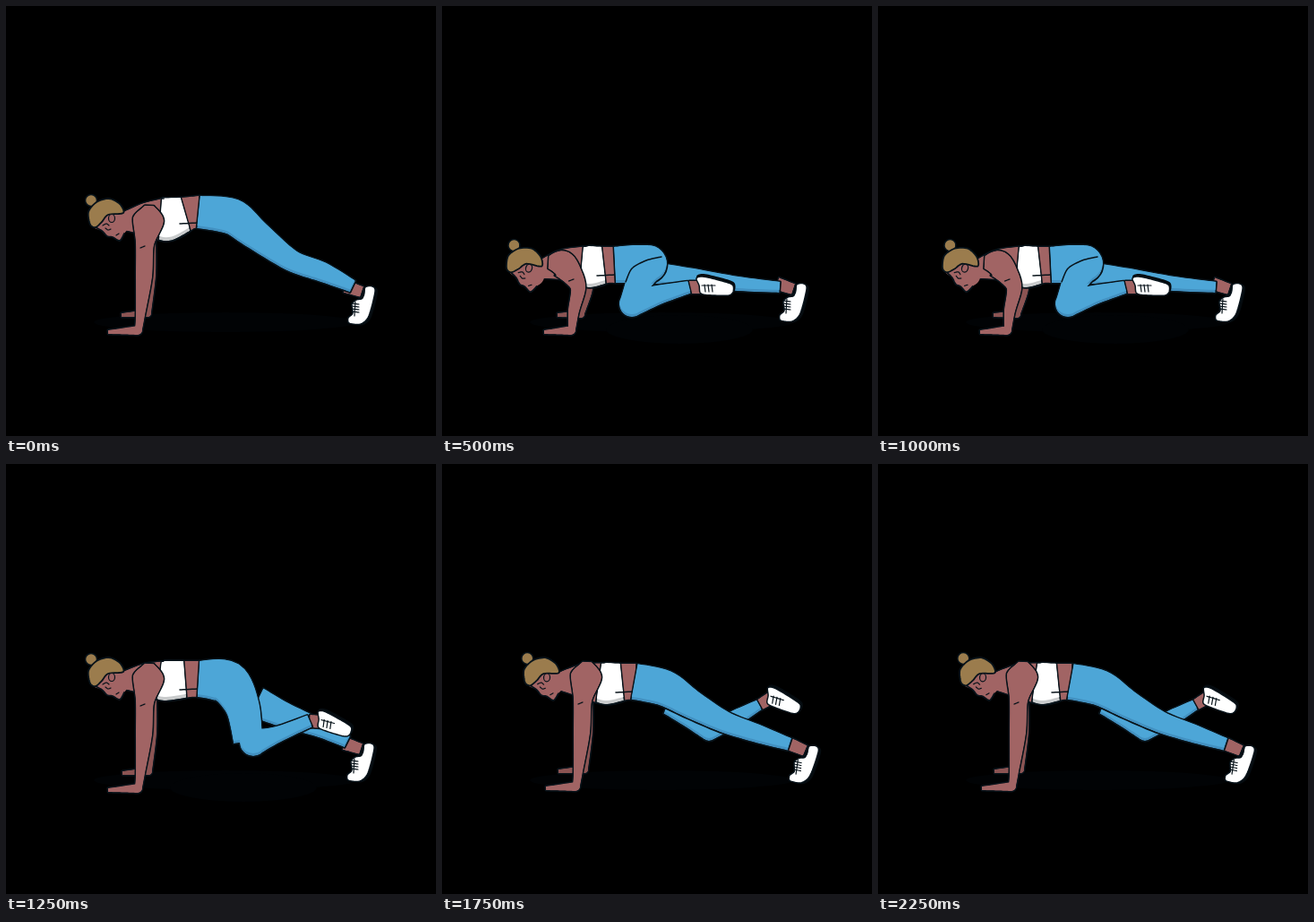
These frames come from a looping animation (480x480 px, 2500 ms). An HTML page with a canvas:

```html
<!DOCTYPE html>
<html lang="en">
<head>
<meta charset="utf-8">
<title>Push-up with knee tuck</title>
<style>
html, body { margin: 0; width: 100%; height: 100%; overflow: hidden; background: #000; }
canvas { display: block; width: 100vmin; height: 100vmin; }
</style>
</head>
<body>
<canvas id="stage" width="480" height="480"></canvas>
<script>
const ctx = document.getElementById('stage').getContext('2d');
const SKIN = ['#a16464', '#905655'], FAR_SKIN = ['#8b5453', '#8b5453'], HAIR = '#9b7c4d',
  BLUE = ['#4da6d7', '#4290c0'], WHITE = ['#fff', '#c9cbcc'],
  LINE = '#08131a', SOLE = '#050b0f', FLOOR = '#010305';
ctx.lineCap = ctx.lineJoin = 'round';

// Samples a smooth curve through points of any dimension
function spline(points, closed) {
  const n = points.length, out = [], steps = 8;
  const at = i => points[closed ? (i + n) % n : Math.max(0, Math.min(n - 1, i))];
  for (let i = 0; i < (closed ? n : n - 1); i++) {
    const [a, b, c, d] = [-1, 0, 1, 2].map(k => at(i + k));
    for (let s = 0; s < steps; s++) {
      const t = s / steps, h = t * t * (3 - 2 * t), u = t * (1 - t) * 0.42;
      out.push(b.map((v, k) => v + (c[k] - v) * h + u * ((1 - t) * (c[k] - a[k]) - t * (d[k] - v))));
    }
  }
  return closed ? out : [...out, points[n - 1]];
}
function trace(points, closed) {
  const path = new Path2D();
  points.forEach(([x, y]) => path.lineTo(x, y));
  if (closed) path.closePath();
  return path;
}
function ink(path, width = 1.5, color = LINE) {
  ctx.strokeStyle = color;
  ctx.lineWidth = width;
  ctx.stroke(path);
}
function fill(path, color) {
  ctx.fillStyle = color;
  ctx.fill(path);
}
const line = (points, width) => ink(trace(spline(points)), width);
function placed([x, y, angle = 0], draw) {
  ctx.save();
  ctx.translate(x, y);
  ctx.rotate(angle);
  draw();
  ctx.restore();
}
function oval(x, y, rx, ry, color) {
  const path = new Path2D();
  path.ellipse(x, y, rx, ry, 0, 0, 7);
  fill(path, color);
  return path;
}

// Outline of a limb whose joints are [x, y, radius]
function tube(joints) {
  const mid = spline(joints), top = [], bottom = [];
  mid.forEach(([x, y, r], i) => {
    const a = mid[Math.max(0, i - 1)], b = mid[Math.min(mid.length - 1, i + 1)];
    const dx = b[0] - a[0], dy = b[1] - a[1], k = r / Math.hypot(dx, dy);
    top.push([x + dy * k, y - dx * k]);
    bottom.unshift([x - dy * k, y + dx * k]);
  });
  return trace([...top, ...bottom], true);
}
// Joined tubes with one outline and a shaded lower edge
function limb([light, dark], chains, shade = 3) {
  const path = new Path2D();
  chains.forEach((joints, i) => {
    path.addPath(tube(joints));
    const [x, y, r] = joints[0], bend = new Path2D();
    bend.arc(x, y, r, 0, 7);
    if (i) path.addPath(bend);
  });
  ink(path, 3);
  ctx.save();
  ctx.clip(path);
  fill(path, dark);
  ctx.translate(0, -shade);
  fill(path, light);
  ctx.restore();
}

const shift = (x, y, chain) => chain.map(([a, b, r]) => [a + x, b + y, r]);
const mix = (a, b, t) => a.map((v, i) => v + (b[i] - v) * t);

function head(place) {
  placed(place, () => {
    const front = [[-14, 8], [-5, 13], [1, 19], [7, 20], [15, 24], [20, 16]];
    ink(oval(-17, -21, 6.5, 6.5, HAIR));
    fill(trace(spline([...front, [25, 8], [23, -6], [0, -8]], true)), SKIN[0]);
    line(front, 1.8);
    const hair = trace(spline([[-18, 6], [-20, -8], [-11, -19], [3, -23], [15, -17], [19, -7],
      [2, -5], [-5, 3], [-12, 9]], true), true);
    fill(hair, HAIR);
    ink(hair, 1.8);
    ink(oval(6, -1, 3.5, 4.5, SKIN[0]), 1.2);
    line([[-4, 7], [0, 5], [3, 7]], 1.2);
    line([[-1, 10], [2, 12], [5, 11]], 1.2);
    line([[11, 18], [14, 16]], 1.2);
  });
}

function plantedShoe(place) {
  placed(place, () => {
    limb(SKIN, [[[-20, -21, 7], [-2, -15, 6]]], 0);
    const shoe = trace(spline([[2, -20], [10, -21], [13, -15], [6, 12], [-3, 21], [-16, 20],
      [-17, 14], [-12, 9], [-13, -1], [-8, -6], [-1, -8]], true), true);
    placed([3, 1], () => fill(shoe, SOLE));
    fill(shoe, WHITE[0]);
    ink(shoe);
    line([[-5, -8], [0, -11], [1, -18]], 2);
    line([[-9, -4], [-10, 12]], 1.2);
    for (let y = -2; y < 9; y += 3) line([[-13, y], [-5, y + 1]], 1.2);
  });
}

function liftedFoot(place, ankle) {
  const [x, y, angle] = place;
  limb(SKIN, [[ankle, [x + 15 * Math.cos(angle), y + 15 * Math.sin(angle), 7]]], 0);
  placed(place, () => {
    const shoe = trace(spline([[8, -10], [15, -12], [33, -8], [48, -3], [49, 5], [44, 9],
      [27, 9], [13, 7], [11, -2]], true), true);
    placed([1, -2], () => { fill(shoe, SOLE); ink(shoe, 2, SOLE); });
    fill(shoe, WHITE[0]);
    ink(shoe);
    for (let i = 17; i < 27; i += 4) line([[i + 1, 5], [i, -3]], 1.2);
    line([[14, -2], [29, -2]], 1.2);
  });
}

function leg(chains, foot) {
  if (chains.length > 1) liftedFoot(foot, chains.at(-1).at(-1));
  limb(BLUE, chains);
}

function torso(joints) {
  const [, b, c, d] = joints, [x, y] = d;
  limb(SKIN, [joints], 0);
  limb(WHITE, [[mix(b, c, 0.7), c, mix(c, d, 0.8)]], 4);
  line([[x - 11, y + 12], [x + 10, y + 11]]);
}

function arm(chains) {
  limb(SKIN, chains, 0);
  const [x, y, r] = chains[0][2];
  line([[x - r / 2, y + 4], [x, y + 2]], 1.3);
}

const straightArm = (x, y) => [
  [[160, 223, 5], [159, 238, 17], [155, 266, 10], [154, 302, 9], [150, 345, 5], [148, 361, 4]],
  [[147, 362, 5], [131, 363, 3.5], [114, 364, 2]]
].map(chain => shift(x, y, chain));
const farArm = (x, y) => [
  [[161, 260, 6], [161, 300, 6], [158, 342, 4]],
  [[158, 343, 4], [129, 345, 2]]
].map(chain => shift(x, y, chain));

const plank = {
  head: [112, 238, 0], shoe: [399, 334, 0], arm: straightArm(0, 0), farArm: farArm(0, 0),
  torso: [[126, 241, 8], [155, 238, 18], [180, 238, 24], [205, 231, 18], [216, 230, 18]],
  front: [[[215, 230, 18], [252, 235, 20], [277, 254, 17], [318, 284, 12], [353, 297, 11], [387, 313, 7]]]
};
const lift = {
  head: [112, 239, 0], shoe: [398, 333, 0], arm: straightArm(0, 0), farArm: farArm(1, 0), wide: true,
  torso: [[126, 242, 8], [155, 240, 17], [178, 242, 22], [205, 240, 20], [216, 240, 20]],
  back: [[[280, 266, 17], [310, 280, 14], [350, 295, 10], [381, 310, 7]]],
  front: [
    [[215, 240, 20], [247, 244, 24], [264, 272, 19], [270, 310, 16]],
    [[276, 311, 15], [303, 302, 9], [339, 287, 7]]
  ],
  foot: [338, 284, 0.26]
};
const tuck = {
  head: [91, 292, 0.28], shoe: [394, 331, 0], wide: true,
  arm: [
    [[119, 286, 7], [134, 288, 15], [147, 303, 11], [152, 316, 8], [147, 340, 6], [145, 361, 4]],
    [[144, 362, 5], [130, 363, 3.5], [114, 364, 2]]
  ],
  farArm: [[[163, 307, 6], [161, 320, 6], [155, 343, 4]], [[155, 344, 4], [129, 345, 2]]],
  torso: [[104, 296, 8], [135, 289, 17], [165, 291, 23], [184, 289, 20], [194, 289, 20]],
  back: [[[235, 298, 12], [280, 303, 10], [330, 310, 8], [377, 314, 6]]],
  front: [
    [[193, 289, 20], [214, 288, 21], [230, 288, 21]],
    [[230, 288, 21], [217, 313, 13], [212, 333, 14]],
    [[212, 333, 14], [240, 323, 11], [276, 314, 7]]
  ],
  foot: [276, 314, 0],
  crease: [[205, 308], [212, 293], [228, 284], [245, 280]]
};
const kick = {
  head: [111, 239, 0.06], shoe: [406, 335, 0.08], arm: straightArm(2, -2), farArm: farArm(1, -2),
  torso: [[126, 243, 8], [155, 242, 18], [184, 245, 23], [205, 243, 20], [216, 243, 20]],
  back: [
    [[250, 273, 6], [280, 288, 9], [298, 300, 9]],
    [[298, 300, 9], [325, 285, 9], [354, 269, 6]]
  ],
  front: [[[215, 243, 20], [248, 250, 20], [278, 268, 16], [315, 288, 12], [355, 302, 10], [388, 313, 7]]],
  foot: [353, 257, 0.3]
};
const low = {
  head: [94, 305, 0.25], shoe: [400, 328, 0.04],
  arm: [
    [[116, 300, 7], [132, 302, 14], [155, 308, 9]],
    [[154, 308, 9], [152, 330, 7], [147, 353, 5]],
    [[147, 354, 5], [133, 356, 3.5], [118, 357, 2]]
  ],
  farArm: [[[147, 336, 4], [129, 337, 2]]],
  torso: [[106, 307, 8], [130, 300, 14], [160, 301, 22], [182, 299, 20], [194, 298, 19]],
  back: [],
  front: [[[192, 298, 19], [228, 303, 25], [262, 316, 19], [310, 314, 10], [345, 312, 8], [382, 314, 6]]],
  sole: [[277, 301, 4], [289, 298, 7], [302, 297, 5]]
};
const deep = {
  ...tuck, head: [86, 300, 0.28], foot: [272, 320, 0],
  arm: low.arm.map(chain => shift(-6, 5, chain)),
  farArm: low.farArm.map(chain => shift(-1, 8, chain)),
  torso: shift(-5, 8, tuck.torso),
  front: tuck.front.map(chain => shift(-4, 6, chain)),
  crease: shift(-4, 6, tuck.crease)
};

function person(pose) {
  oval(245, 353, 147, 11, FLOOR);
  if (pose.wide) oval(265, 361, 82, 16, FLOOR);
  limb(FAR_SKIN, pose.farArm, 0);
  plantedShoe(pose.shoe);
  if (pose.sole) {
    limb([SOLE, SOLE], [pose.sole]);
    oval(277, 301, 4, 3, WHITE[0]);
  }
  if (pose.back?.length) leg(pose.back, pose.foot);
  torso(pose.torso);
  head(pose.head);
  leg(pose.front, pose.foot);
  if (pose.crease) line(pose.crease);
  arm(pose.arm);
}

const poses = [plank, lift, tuck, deep, tuck, lift, plank, kick, low, kick];
function frame(time) {
  ctx.clearRect(0, 0, 480, 480);
  person(poses[Math.floor(Math.max(0, time) / 250) % poses.length]);
  requestAnimationFrame(frame);
}
requestAnimationFrame(frame);
</script>
</body>
</html>
```
